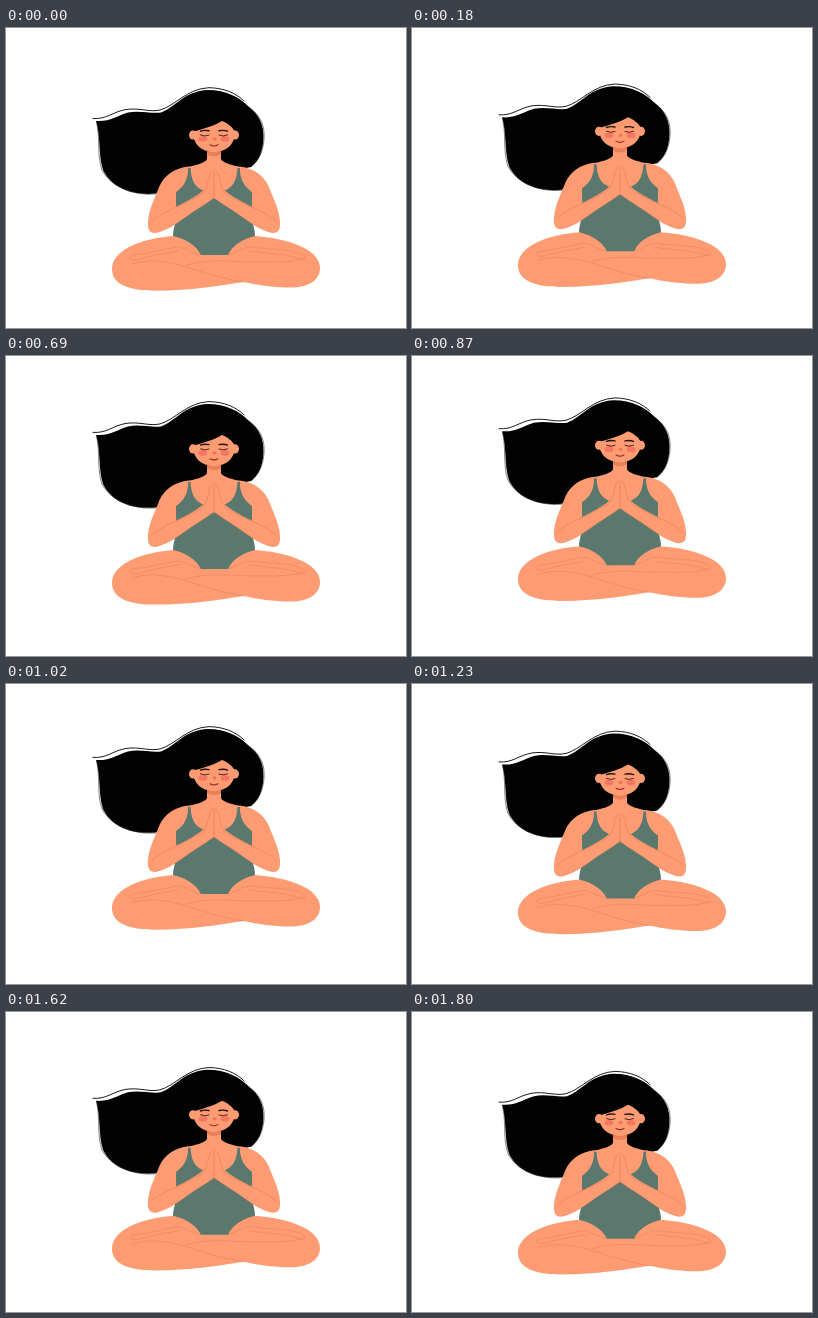
Recreate the animation shown at these times as an HTML page with a canvas. Size 400x300 px, loop 1.83 s.

```html
<!DOCTYPE html>
<html lang="en">
<head>
<meta charset="utf-8">
<title>Floating meditation</title>
<style>
html, body { margin: 0; width: 100%; height: 100%; overflow: hidden; background: #fff; }
canvas { display: block; width: 400px; height: 300px; }
</style>
</head>
<body>
<canvas id="stage" width="400" height="300"></canvas>
<script>
const ctx = document.getElementById('stage').getContext('2d');
const LOOP = 1830, STEP = 30, PEAK = 930, LAND = 1815, RISE = 19;
const SKIN = '#fd9c73', SHADE = '#ea8058', GREEN = '#5b786f', BLACK = '#020202';

function fill(d, color) {
  ctx.fillStyle = color;
  ctx.fill(new Path2D(d));
}

function line(d, color, width) {
  ctx.strokeStyle = color;
  ctx.lineWidth = width;
  ctx.stroke(new Path2D(d));
}

function dot(x, y, rx, ry, color) {
  ctx.fillStyle = color;
  ctx.beginPath();
  ctx.ellipse(x, y, rx, ry, 0, 0, Math.PI * 2);
  ctx.fill();
}

// Draws a part on both sides of the body axis at x = 208.
function both(draw) {
  draw();
  ctx.save();
  ctx.translate(416, 0);
  ctx.scale(-1, 1);
  draw();
  ctx.restore();
}

function hair() {
  fill('M90 93 C104 94 110 88 122 84.5 C134 82 145 86 155 84.5 C170 79 178 63 202 62 C220 62 233 69 242 78 C253 86 258 97 257.5 110 C257 122 254 132 245 139 L190 150 L150 165.5 C125 168 105 159 97 142 C92 127 95 110 90 93 Z', BLACK);
  line('M87 90.5 C101 91.5 106 84 120 81.5 C134 79.5 143 84.5 154 82 C169 78 181 60.5 203 59.7 C218 60 230 65 238 73', BLACK, 0.9);
  line('M91 96 C94 112 91 128 96 142 C104 158 126 168 150 166', '#333', 0.6);
  line('M245 81 C256 89 259 100 258 112 C257 123 253 133 245 139', '#333', 0.6);
}

function legs() {
  fill('M168 208 C138 210 106 221 106 241 C106 256 122 262.7 150 262.7 C184 262.5 213 258 237 254 C252 257 267 259.5 284 259.5 C303 259.5 314 252 314 240 C314 221 281 210 248 208 Z', SKIN);
  line('M126 236 C147 229 172 236 190 242 C205 247 220 251 237 254', SHADE, 0.6);
  line('M168 208 C180 210 190 216 196 227 C184 225 181 220 172 219 C157 221 143 226 127 227 C121 229 125 234 134 231 C148 227 162 225 172 223', SHADE, 0.6);
  line('M248 208 C236 210 226 217 222 227 C232 224 236 219 246 219 C263 222 279 220 293 225 C301 228 300 234 294 231 C278 225 260 226 244 223', SHADE, 0.6);
  line('M180 237 C205 230 224 234 246 234 C267 234 286 235 297 230', SHADE, 0.6);
}

function arm() {
  fill('M183 138.5 C168 140 159 147 153.5 158 C150 168 143 180 142 193 C141.5 201 143 205 149 205 C163 202 175 192 186 184.5 C196 178 203 173.5 208 170 L208 142 C204 143 203 150 202 157 C198 164 184 172 170 179 L170 164 C178 158 182 152 182 139 Z', SKIN);
  line('M146 193 C155 184 178 177 196 166 C204 158 201 145 207 142', SHADE, 0.7);
  line('M150 204.5 C163 202 175 192 186 184.5 C196 178 203 173.5 208 170', SHADE, 0.5);
}

function body() {
  fill('M201 121 V131 C200 135 187 138 181 139 L168 160 L170 205 H246 L248 160 L235 139 C229 138 216 135 215 131 V121 Z', SKIN);
  fill('M182 140 L184.5 140 C185.5 152 188 164 208 164 C228 164 230.5 152 231.5 140 L234 140 C234 153 240 159 246 164 C247 177 244 186 246 193 C248 199 249 204 249 208 C237 211 226 217 222 227 H195 C190 217 180 211 167 208 C167 204 168 199 170 193 C172 185 169 175 170 164 C176 159 182 153 182 140 Z', GREEN);
  both(arm);
  line('M208 144 V170', SHADE, 0.8);
}

function face() {
  both(() => dot(187, 107, 4, 4.6, SKIN));
  fill('M187 104 C196 101 208 98 216 93 C221 95 227 99 229 104 C229 116 221 124 208 124 C195 124 187 116 187 104 Z', SKIN);
  fill('M201 122 C205 125 211 125 215 122 V126 C211 129 205 129 201 126 Z', '#ea8059');
  both(() => {
    dot(197, 111, 4.4, 2.8, '#f57662');
    line('M194.5 103.2 Q198 101.8 203 102.7', '#25120e', 1.4);
    line('M194.5 107 Q199 109 203 107.2', '#391a13', 0.9);
  });
  dot(208.5, 111, 2, 1.6, '#f47157');
  line('M204 116.8 Q208 119.2 212 116.8', '#942d27', 1.1);
}

function lift(t) {
  return RISE * Math.max(0, t < PEAK ? t / PEAK : (LAND - t) / (LAND - PEAK));
}

function frame(now) {
  const t = Math.floor((now % LOOP) / STEP) * STEP;
  ctx.fillStyle = '#fff';
  ctx.fillRect(0, 0, 400, 300);
  ctx.save();
  ctx.translate(0, -lift(t));
  ctx.lineCap = ctx.lineJoin = 'round';
  hair();
  legs();
  body();
  face();
  ctx.restore();
  requestAnimationFrame(frame);
}

frame(0);
</script>
</body>
</html>
```
